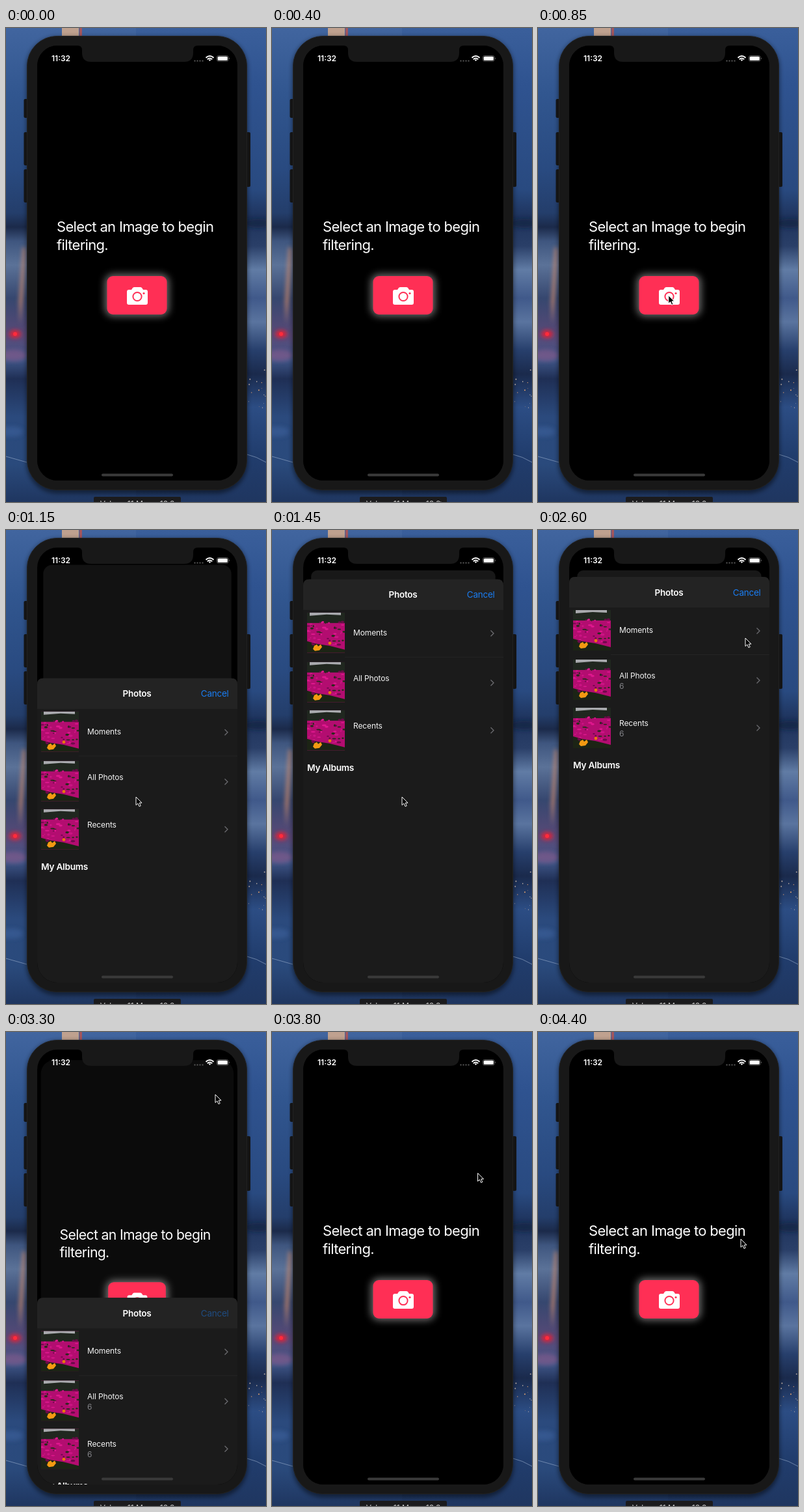
Write an HTML page that moves like this. It is 400x728 px and loops after 4450 ms.

```html
<!DOCTYPE html>
<html lang="en">
<head>
<meta charset="utf-8">
<title>Photo picker</title>
<style>
  html, body { margin: 0; width: 100%; height: 100%; overflow: hidden; background: #000; }
  svg { display: block; width: 100vw; height: 100vh; font-family: Inter, "Open Sans", sans-serif; }
  .prompt { font-size: 22px; letter-spacing: -.03em; fill: #fff; }
  .row { font-size: 12px; letter-spacing: -.01em; fill: #f4f4f4; }
  .count { font-size: 12px; fill: #85858a; }
  .bar { font-size: 13.5px; letter-spacing: -.02em; }
  .bold { font-weight: 600; fill: #fff; }
</style>
</head>
<body>
<svg viewBox="0 0 400 728" xmlns="http://www.w3.org/2000/svg">
  <defs>
    <linearGradient id="skyLeft" x2="0" y2="1">
      <stop offset="0" stop-color="#41659f"/>
      <stop offset=".14" stop-color="#31568f"/>
      <stop offset=".3" stop-color="#294a80"/>
      <stop offset=".39" stop-color="#243e6b"/>
      <stop offset=".42" stop-color="#1b2a4a"/>
      <stop offset=".45" stop-color="#3f567f"/>
      <stop offset=".5" stop-color="#5b7298"/>
      <stop offset=".57" stop-color="#36476f"/>
      <stop offset=".65" stop-color="#5a4a78"/>
      <stop offset=".7" stop-color="#3f5688"/>
      <stop offset=".74" stop-color="#1f2f55"/>
      <stop offset=".82" stop-color="#2b4a7d"/>
      <stop offset=".92" stop-color="#2a4a7c"/>
      <stop offset="1" stop-color="#1f3660"/>
    </linearGradient>
    <linearGradient id="skyRight" x2="0" y2="1">
      <stop offset="0" stop-color="#3a5f9b"/>
      <stop offset=".12" stop-color="#2f5390"/>
      <stop offset=".34" stop-color="#294a80"/>
      <stop offset=".4" stop-color="#1e335c"/>
      <stop offset=".46" stop-color="#2a3f68"/>
      <stop offset=".51" stop-color="#617ca5"/>
      <stop offset=".57" stop-color="#40598a"/>
      <stop offset=".62" stop-color="#5a749f"/>
      <stop offset=".68" stop-color="#273f6c"/>
      <stop offset=".73" stop-color="#1a2a4c"/>
      <stop offset=".8" stop-color="#2c4d84"/>
      <stop offset=".9" stop-color="#213d6d"/>
      <stop offset="1" stop-color="#1f3660"/>
    </linearGradient>
    <filter id="soft" x="-100%" y="-100%" width="300%" height="300%"><feGaussianBlur stdDeviation="3"/></filter>
    <filter id="glow" x="-50%" y="-50%" width="200%" height="200%"><feGaussianBlur stdDeviation="6"/></filter>
    <clipPath id="screen"><rect x="48" y="27" width="308" height="668" rx="31"/></clipPath>
    <clipPath id="photoBox"><rect width="58" height="62"/></clipPath>
    <g id="photo" clip-path="url(#photoBox)">
      <rect width="58" height="62" fill="#b30d70"/>
      <rect width="58" height="16" fill="#20271f"/>
      <path d="M4 0H52V4L30 3L4 5Z" fill="#a9aaae"/>
      <path d="M0 44L14 48L34 51L58 57V62H0Z" fill="#1c2415"/>
      <g id="petals"></g>
      <path d="M11 51l4-2 2 3 4-3 2 4-4 5-7 1-3-3z" fill="#f39a12"/>
      <circle cx="35" cy="47" r="2.4" fill="#e8780f"/>
    </g>
  </defs>

  <g id="wallpaper">
    <rect width="200" height="728" fill="url(#skyLeft)"/>
    <rect x="200" width="200" height="728" fill="url(#skyRight)"/>
    <rect x="86" width="26" height="14" fill="#bfa18f"/>
    <rect x="113" width="4" height="14" fill="#a0565f"/>
    <g filter="url(#soft)">
      <path d="M26 335L30 340L26 415L22 455L20 420Z" fill="#d08a6a" opacity=".8"/>
      <ellipse cx="14" cy="470" rx="9" ry="6" fill="#e02238"/>
      <ellipse cx="12" cy="503" rx="20" ry="9" fill="#8a5a8c" opacity=".6"/>
      <ellipse cx="388" cy="300" rx="22" ry="7" fill="#152340" opacity=".7"/>
      <ellipse cx="8" cy="620" rx="18" ry="8" fill="#3c629c" opacity=".6"/>
    </g>
    <circle cx="14" cy="470" r="3" fill="#ff2c3c"/>
    <path d="M371 655Q385 658 400 667M0 658L32 667" stroke="#9bb0cd" fill="none" opacity=".6"/>
    <g id="lights"></g>
  </g>

  <rect x="31" y="13" width="341" height="702" rx="48" filter="url(#soft)" opacity=".45"/>
  <g fill="#141414">
    <rect x="27.5" y="109" width="8" height="29" rx="2"/>
    <rect x="27.5" y="160" width="8" height="51" rx="2"/>
    <rect x="27.5" y="217" width="8" height="51" rx="2"/>
    <rect x="368" y="160" width="8" height="84" rx="2"/>
  </g>
  <rect x="32.5" y="12.5" width="338" height="697" rx="46" fill="#181818" stroke="#222"/>

  <g clip-path="url(#screen)">
    <rect x="48" y="27" width="308" height="668"/>
    <g id="card">
      <rect id="cardBack" x="48" y="27" width="308" height="668" rx="31"/>
      <text class="prompt" x="78" y="313">Select an Image to begin</text>
      <text class="prompt" x="78" y="341">filtering.</text>
      <rect x="152" y="378" width="99" height="65" rx="13" fill="#fff" opacity=".42" filter="url(#glow)"/>
      <rect x="155.5" y="381" width="92" height="59" rx="9" fill="#ff2f55"/>
      <path d="M189 402H193L195 399Q196 398 197.500 398H206.500Q208 398 209 399L211 402H215Q218 402 218 405V422Q218 425 215 425H189Q186 425 186 422V405Q186 402 189 402Z" fill="#fff"/>
      <circle cx="202" cy="412.500" r="6.600" fill="none" stroke="#ff2f55" stroke-width="2"/>
      <circle cx="212" cy="407.500" r="1.600" fill="#ff2f55"/>
    </g>
    <path d="M110 26H295V27Q288 27 288 34V38Q288 52 274 52H131Q117 52 117 38V34Q117 27 110 27Z" fill="#181818"/>

    <text class="bold" x="70" y="51" font-size="12">11:32</text>
    <path d="M289.500 50.500H304" stroke="#5a5a5a" stroke-width="2" stroke-dasharray="2 2"/>
    <g fill="none" stroke="#fff" stroke-width="1.900">
      <path d="M307.500 45.800Q313.500 40.300 319.500 45.800M309.800 48.200Q313.500 45 317.200 48.200"/>
      <path d="M311.700 48.900Q313.500 47.600 315.300 48.900L313.500 51Z" fill="#fff" stroke="none"/>
    </g>
    <rect x="324.500" y="42.500" width="17.500" height="8.500" rx="2.500" fill="none" stroke="#777" stroke-width=".8"/>
    <rect x="325.700" y="43.700" width="15.100" height="6.100" rx="1.500" fill="#fff"/>
    <path d="M343 45.300Q344.800 46.700 343 48.200Z" fill="#888"/>

    <g id="sheet">
      <rect x="48" width="308" height="700" rx="9" fill="#1b1b1b"/>
      <path d="M48 47V9Q48 0 57 0H347Q356 0 356 9V47Z" fill="#232323"/>
      <text class="bar bold" x="201.500" y="28.500" text-anchor="middle">Photos</text>
      <text class="bar" id="cancel" x="342.500" y="28.500" text-anchor="end" fill="#1a7df2">Cancel</text>
      <path d="M112 119.500H356" stroke="#242424"/>
      <g id="rows"></g>
      <text class="bold" x="54" y="294" font-size="13.700" letter-spacing="-.27">My Albums</text>
    </g>
    <rect id="home" x="147" y="684.500" width="110" height="4" rx="2" fill="#3a3a3a"/>
  </g>

  <rect x="135" y="720" width="134" height="20" rx="2" fill="#1b1b1d"/>
  <text x="202" y="735" font-size="12" fill="#c8c8c8" text-anchor="middle">Velune 11 Max – 13.3</text>

  <path id="cursor" d="M0 0V12.500L2.900 9.900L5 14.600L7.200 13.600L5.200 9.100H9Z" fill="#000" stroke="#fff" stroke-width="1" stroke-linejoin="round"/>
</svg>
<script>
const LOOP = 4450, STEP = 50;
const SHEET_TOP = 72, SHEET_HIDDEN = 698;
const OPEN_AT = 970, CANCEL_AT = 3100, CLOSE_AT = 3180, COUNTS_AT = 1600;
const SPRING = 15; // per second

const cursorPath = [
  [350, 262, 740], [780, 201, 411], [1000, 200, 410], [2150, 200, 410],
  [2600, 319, 166], [2850, 322, 96], [3350, 322, 96], [4200, 312, 318]
];
const rows = [
  { label: 'Moments', photo: 51, text: 86, arrow: 83 },
  { label: 'All Photos', photo: 127, text: 156, arrow: 159, count: 6 },
  { label: 'Recents', photo: 201, text: 229, arrow: 232, count: 6 }
];

const byId = id => document.getElementById(id);

function add(parent, tag, attrs, text) {
  const el = document.createElementNS('http://www.w3.org/2000/svg', tag);
  for (const key in attrs) el.setAttribute(key, attrs[key]);
  if (text !== undefined) el.textContent = text;
  return parent.appendChild(el);
}

function randomFrom(seed) {
  return () => (seed = (seed * 16807) % 2147483647) / 2147483647;
}

function buildScene() {
  const random = randomFrom(41);
  const petalColors = ['#e0188f', '#6d0a4a', '#2a2a1c', '#cc1484'];
  for (let i = 0; i < 48; i++) {
    add(byId('petals'), 'ellipse', {
      cx: random() * 58, cy: 14 + random() * 36,
      rx: 1 + random() * 2.5, ry: .6 + random() * 1.2, fill: petalColors[i % 4]
    });
  }
  for (let i = 0; i < 14; i++) {
    add(byId('lights'), 'circle', {
      cx: 373 + random() * 26, cy: 525 + random() * 60,
      r: .4 + random() * .6, fill: i % 3 ? '#c9b9ae' : '#e0a070'
    });
  }
  for (const row of rows) {
    const parent = byId('rows');
    add(parent, 'use', { href: '#photo', x: 54, y: row.photo });
    add(parent, 'text', { class: 'row', x: 125, y: row.text }, row.label);
    if (row.count) add(parent, 'text', { class: 'count', x: 125, y: row.text + 16 }, row.count);
    add(parent, 'path', {
      d: `M336.500 ${row.arrow - 4.5}l4.500 4.500l-4.500 4.500`,
      fill: 'none', stroke: '#68686c', 'stroke-width': 1.4
    });
  }
}

const mix = (a, b, k) => a + (b - a) * k;
const clamp = k => Math.min(1, Math.max(0, k));
const ease = k => k * k * (3 - 2 * k);

// Critically damped spring: 1 at the start, falling to 0.
function settle(ms) {
  const x = SPRING * Math.max(0, ms) / 1000;
  return (1 + x) * Math.exp(-x);
}

function cursorAt(t) {
  const next = cursorPath.findIndex(point => point[0] > t);
  if (next < 0) return cursorPath[cursorPath.length - 1].slice(1);
  if (next === 0) return null;
  const [t0, x0, y0] = cursorPath[next - 1], [t1, x1, y1] = cursorPath[next];
  const k = ease((t - t0) / (t1 - t0));
  return [mix(x0, x1, k), mix(y0, y1, k)];
}

function draw(t) {
  const open = t < CLOSE_AT ? 1 - settle(t - OPEN_AT) : settle(t - CLOSE_AT);
  byId('sheet').setAttribute('transform', `translate(0 ${mix(SHEET_HIDDEN, SHEET_TOP, open)})`);

  const scale = 1 - .08 * open, shade = Math.round(24 * open);
  byId('card').setAttribute('transform',
    `translate(201.500 466) scale(${scale}) translate(-201.500 -466)`);
  byId('cardBack').setAttribute('fill', `rgb(${shade},${shade},${shade})`);
  byId('cardBack').setAttribute('rx', mix(31, 10, open));

  byId('cancel').setAttribute('opacity', 1 - .55 * clamp((t - CANCEL_AT) / 100));
  for (const count of document.querySelectorAll('.count'))
    count.setAttribute('visibility', t >= COUNTS_AT ? 'visible' : 'hidden');

  const tip = cursorAt(t), cursor = byId('cursor');
  cursor.setAttribute('visibility', tip ? 'visible' : 'hidden');
  if (tip) cursor.setAttribute('transform', `translate(${tip})`);
}

buildScene();
const start = performance.now();
function tick() {
  const t = (performance.now() - start) % LOOP;
  draw(Math.floor(t / STEP) * STEP);
  requestAnimationFrame(tick);
}
tick();
</script>
</body>
</html>
```
